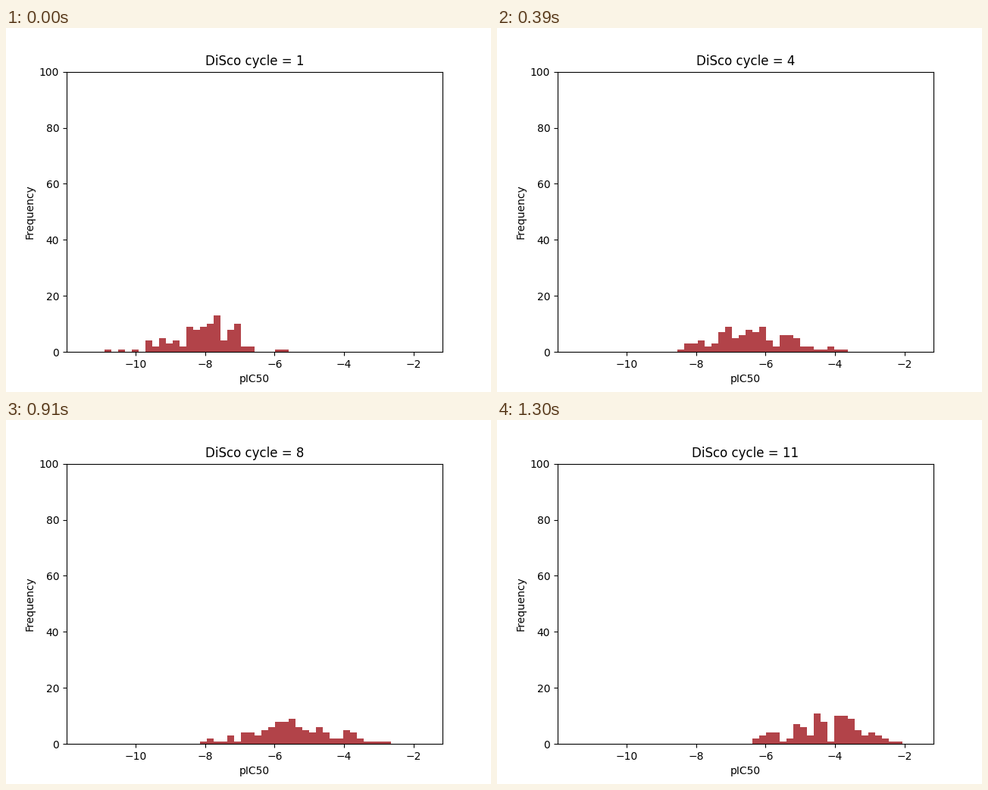
A matplotlib script for the animation above (1.43 s loop, 640 px wide and 480 px high).

```python
import matplotlib.pyplot as plt
import numpy as np
from matplotlib.animation import FuncAnimation

CYCLES = 11
BINS = 50
SAMPLES = 100
LO, HI = -11.496, -1.655
SPREAD = 1.06
RED = "#b24349"

# The mean climbs quickly, rests on a plateau, then climbs again.
KEY_CYCLES = (1, 5, 7, 9, 11)
KEY_MEANS = (-7.97, -5.73, -5.45, -5.45, -4.27)

edges = np.linspace(LO, HI, BINS + 1)


def histogram(cycle):
    """Bin the potencies of one batch, scattered around the cycle's mean."""
    rng = np.random.default_rng(cycle)
    mean = np.interp(cycle, KEY_CYCLES, KEY_MEANS)
    batch = rng.normal(mean, SPREAD, SAMPLES)
    return np.histogram(batch, edges)[0]


plt.rcParams["font.family"] = "DejaVu Sans"
fig, ax = plt.subplots(figsize=(6.4, 4.8), dpi=100)
bars = ax.bar(edges[:-1], histogram(1), width=np.diff(edges), align="edge",
              color=RED, linewidth=0)
margin = 0.05 * (HI - LO)
ax.set(xlim=(LO - margin, HI + margin), ylim=(0, 100),
       xticks=range(-10, -1, 2), xlabel="pIC50", ylabel="Frequency")
title = ax.set_title("DiSco cycle = 1")


def update(i):
    cycle = i + 1
    for bar, count in zip(bars, histogram(cycle)):
        bar.set_height(count)
    title.set_text(f"DiSco cycle = {cycle}")
    return [*bars, title]


anim = FuncAnimation(fig, update, frames=CYCLES, interval=130,
                     repeat=True, repeat_delay=0, blit=False)
plt.show()
```
